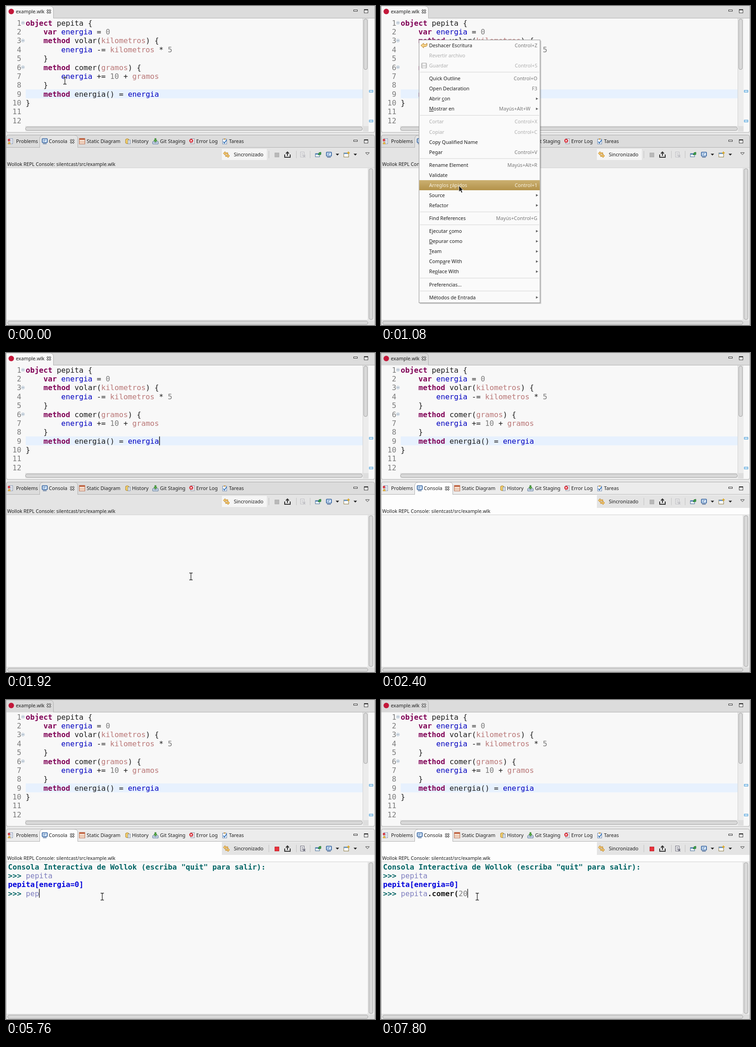
An HTML page for the animation above (8 s loop, 805 by 696 pixels).

```html
<!DOCTYPE html>
<html lang="es">
<head>
<meta charset="utf-8">
<title>Consola interactiva</title>
<style>
html, body { margin: 0; width: 100%; height: 100%; overflow: hidden; background: #e9e9e9; }
svg { display: block; width: 805px; height: 696px; }
text { font: 10.7px 'Noto Sans', sans-serif; fill: #1c1c1c; white-space: pre; }
.mono { font: 16.1px 'DejaVu Sans Mono', monospace; fill: #1c1c1c; }
.kw { font-weight: bold; fill: #7f0055; }
.field { fill: #0000c0; }
.param { fill: #b97777; }
.num, .line { fill: #7b7b7b; }
.prompt { font-weight: bold; fill: #006464; }
.result { font-weight: bold; fill: #0000dc; }
.typed { fill: #7d7dbe; }
.call { font-weight: bold; fill: #1c1c1c; }
.thumb { fill: #d9d9d9; stroke: #a3a3a3; }
.edge { fill: none; stroke: #ababab; }
.sep { stroke: #d4d4d4; }
.mn { text-decoration: underline; }
.key { fill: #777; text-anchor: end; }
.off text { fill: #aeaeae; }
.hover { fill: none; }
.on .hover { fill: url(#gold); }
.on text { fill: #faf4e4; }
.on .arrow { fill: #eadfc0; }
.arrow { fill: #666; }
</style>
</head>
<body>
<svg id="stage" viewBox="0 0 805 696"></svg>
<script>
const CHAR = 9.692, LINE = 19.36;
const EDITOR = { x: 43, y: 27.2 }, CONSOLE = { x: 4.5, y: 354 };

const rect = (x, y, w, h, fill, more = '') =>
  `<rect x="${x}" y="${y}" width="${w}" height="${h}" fill="${fill}" ${more}/>`;
const path = (d, fill = 'none', stroke = 'none', width = 1) =>
  `<path d="${d}" fill="${fill}" stroke="${stroke}" stroke-width="${width}"/>`;
const label = (x, y, s, cls = '') => `<text x="${x}" y="${y}" class="${cls}">${s}</text>`;
const group = (id, body, more = '') => `<g id="${id}" ${more}>${body}</g>`;
const at = (x, y, body) => `<g transform="translate(${x} ${y})">${body}</g>`;
const span = (cls, s) => `<tspan class="${cls}">${s}</tspan>`;
const thumb = (x, y, w, h) => `<rect x="${x}" y="${y}" width="${w}" height="${h}" rx="3.5" class="thumb"/>`;
const baseline = (area, row) => area.y + 15.5 + row * LINE;

/* Icons, centred on the origin */
const cross = path('M-3.8 -3.8L3.8 3.8M3.8 -3.8L-3.8 3.8', 'none', '#333', 3.7) +
  path('M-3.5 -3.5L3.5 3.5M3.5 -3.5L-3.5 3.5', 'none', '#f8f8f8', 1.6);
const sheet = stroke => rect(-4.5, -5.5, 8, 11, '#fbfbfb', `stroke="${stroke}"`) +
  path('M-2.5 -2.5h4M-2.5 0h4M-2.5 2.5h4', 'none', stroke);
const logo = '<circle r="6" fill="#c3183a"/>';
const monitor = rect(-5.5, -5.5, 11, 8.5, '#dcebfa', 'rx="1" stroke="#2f5f9e" stroke-width="1.6"') +
  path('M-3 -2.5h5M-3 0h3', 'none', '#2f5f9e') + path('M-4 5.5h8', 'none', '#55729a', 1.6);
const failure = '<circle cx="-1" cy="-1" r="4.2" fill="#d9303a"/>' +
  path('M-2.7 -2.7l3.4 3.4M.7 -2.7l-3.4 3.4', 'none', '#fff', 1.2);
const problems = at(1, 0, sheet('#7f93b5')) + rect(-6, -5, 5, 5, '#d8404a', 'rx="1"') +
  path('M-6 6l3 -5l3 5z', '#f0bd3e', '#b58620', .7);
const table = rect(-6, -6, 12, 12, '#fff7ee', 'stroke="#b45a36"') +
  rect(-6, -6, 12, 3, '#bd5a36') + path('M-6 0h12M-6 3h12', 'none', '#c87b50');
const history = path('M-5 -4q3.5 -3 7 0v8q-3.5 3 -7 0z', '#f3cf6b', '#a77c21') +
  rect(0, -2.5, 5, 8, '#fdfdfd', 'stroke="#71849f"') + path('M1.5 0h2M1.5 2.5h2', 'none', '#71849f');
const staging = path('M-6 1v5h12v-5h-3l-1 2h-4l-1 -2z', '#d9e3ee', '#4a6a94') +
  path('M-1.5 -6h3v4h2.5l-4 4l-4 -4h2.5z', '#56a847', '#2e7a2a', .8);
const errors = at(1.5, 0, sheet('#8a8a9c')) + at(-1, 0, failure);
const tasks = rect(-4.5, -4.5, 9, 10.5, '#f6f8fc', 'stroke="#6d88b1"') +
  rect(-2, -6, 4, 2.5, '#c79a4e') + path('M-3 1l2.5 3l5 -7', 'none', '#2e6fb5', 1.7);
const sync = path('M-7 -2.5l4 -4v2.5h6v3h-6v2.5z', '#f2c56b', '#b67a18', .8) +
  path('M7 3l-4 -4v2.5h-5v3h5v2.5z', '#f2c56b', '#b67a18', .8);
const share = path('M-6 0v6h12v-6M0 3v-8M-3.3 -2L0 -5.6L3.3 -2', 'none', '#333', 2);
const pin = rect(-6, -2, 9, 7, '#fff', 'stroke="#39648f"') + rect(-6, -2, 9, 2.2, '#4c7fb5') +
  path('M0 1l2 -5l4 -1v5z', '#3ea24b', '#24752f');
const newConsole = rect(-6, -3.5, 10.5, 9, '#fff', 'stroke="#8c7b43"') +
  rect(-6, -3.5, 10.5, 2.5, '#6b9bd2') + path('M4 -6.5v6M1 -3.5h6', 'none', '#d9a520', 1.8);
const caretDown = path('M-3.8 -2h7.6l-3.8 4z', '#222');
const clear = sheet('#667') + path('M1 1l5 5M6 1l-5 5', 'none', '#667', 1.5);
const undo = path('M-7 0l6 -5v3h4q3 0 3 -3q2 7 -3 7.5h-4v3z', '#f7d58c', '#b9832c');
const disk = rect(-5.5, -5.5, 11, 11, '#d6d6d6', 'rx="1" stroke="#a5a5a5"') +
  rect(-3, -5, 6, 4, '#f5f5f5') + rect(-3, 1.5, 6, 4, '#efefef');

/* Editor */
const source = `object pepita {
    var energia = 0
    method volar(kilometros) {
        energia -= kilometros * 5
    }
    method comer(gramos) {
        energia += 10 + gramos
    }
    method energia() = energia
}

`.split('\n');
const rules = { kw: /^(object|var|method)$/, field: /^energia$/, param: /^(kilometros|gramos)$/, num: /^\d+$/ };
const highlight = s => s.replace(/energia\(\)|\w+/g, word => {
  const rule = Object.keys(rules).find(name => rules[name].test(word));
  return rule ? span(rule, word) : word;
});
const code = source.map((s, i) => {
  const y = baseline(EDITOR, i);
  const fold = [0, 2, 5].includes(i)
    ? at(37, y - 6, '<circle r="3.2" fill="#eef3f8" stroke="#a9b9ca" stroke-width=".9"/>' + path('M-2 0h4', 'none', '#6d8196')) : '';
  return `<text x="33.5" y="${y}" text-anchor="end" class="mono line">${i + 1}</text>` + fold +
    label(EDITOR.x, y, highlight(s), 'mono');
}).join('');

const windowButtons = y => rect(758.5, y + 1.5, 8, 3, '#fff', 'stroke="#333"') +
  rect(781.5, y + .5, 8, 7.5, '#fff', 'stroke="#333"') + rect(781, y, 9, 2.4, '#333');
const marker = y => rect(792.5, y - 2, 8, 4, '#d3eafa', 'stroke="#4298d3"');

const editor =
  rect(0, 0, 805, 276, '#dcdcdc') +
  rect(1, 26, 803, 249, '#f8f8f8') +
  path('M104 26.5H805', 'none', '#b2b2b2') +
  '<path id="editorTab" d="M0 27V0H96q7.5 1 7.5 8V27" stroke="#b2b2b2"/>' +
  at(11.5, 12, logo) + label(21.5, 16, 'example.wlk') + at(93.5, 12, cross) + windowButtons(7) +
  rect(43, EDITOR.y + 8 * LINE, 736, LINE, '#e7f1fe') +
  code +
  rect(779, 27, 12, 235, '#ececec') + path('M778.5 27V262', 'none', '#d2d2d2') +
  rect(42, 262, 737, 12, '#ededed') + rect(779, 262, 12, 12, '#dedede') +
  path('M42 262.5H779', 'none', '#d6d6d6') +
  thumb(780.5, 28.5, 8, 110) + thumb(42.5, 264, 735, 7.5) + marker(186) + marker(251) +
  `<rect id="editorCaret" x="334.2" y="${EDITOR.y + 8 * LINE}" width="1.4" height="${LINE}"/>` +
  '<path class="edge" d="M.5 0V271q0 5 5 5H799.5q5 0 5 -5V0"/>';

/* Lower panel */
const tabs = [
  [10, problems, 22, 'Problems'], [84.5, monitor, 93.5, 'Consola'], [166, table, 176, 'Static Diagram'],
  [266, history, 275, 'History'], [326, staging, 336, 'Git Staging'], [406, errors, 415, 'Error Log'],
  [477, tasks, 486.5, 'Tareas']
].map(([x, icon, tx, s]) => at(x, 295, icon) + label(tx, 299.3, s)).join('');

const panel =
  rect(0, 276.5, 805, 4.5, '#e9e9e9') +
  '<path id="tabBar" d="M.5 696V287q0 -5.5 5 -5.5H799.5q5 0 5 5.5V696" stroke="#ababab"/>' +
  '<rect id="strip" x="1" y="308.5" width="803" height="44.5"/>' +
  path('M1 308.5H804', 'none', '#b2b2b2') +
  '<path id="consoleTab" d="M73.5 309V289q1 -7 8 -7H149q7.5 0 7.5 7V309" stroke="#b2b2b2"/>' +
  tabs + at(144.5, 295.3, cross) + windowButtons(291) +
  rect(471, 310, 333, 28, '#e4e4e4') +
  rect(471, 312, 98, 24, '#f5f5f5', 'id="syncButton"') +
  at(481, 324, sync) + label(497, 327.8, 'Sincronizado') +
  path('M573.5 316v16M633.5 316v16M663.5 316v16', 'none', '#c2c2c2') +
  '<rect id="stop" x="586.5" y="320.5" width="9" height="9"/>' + at(614, 324, share) +
  group('clear', at(647, 324, clear)) + at(681, 324, pin) + at(704.5, 324.5, monitor) +
  at(723, 324.3, caretDown) + at(743, 324, newConsole) + at(762, 324.3, caretDown) +
  path('M784.5 320h8l-4 4.5z', '#fff', '#333') +
  '<text x="2.5" y="348.7" style="font-size:10.43px">Wollok REPL Console: silentcast/src/example.wlk</text>' +
  rect(1, 353, 803, 343, '#f8f8f8') + path('M1 353H804', 'none', '#cfcfcf') +
  rect(790, 354, 14, 332, '#ebebeb') + rect(1, 685, 789, 11, '#ebebeb') + rect(790, 686, 14, 10, '#dedede') +
  path('M790 354V685.5H1', 'none', '#d2d2d2') +
  thumb(792, 355, 8.5, 329) + thumb(3.5, 687.5, 786, 7.5) +
  group('output', '') + `<rect id="caret" width="1.2" height="${LINE}"/>`;

/* Menus: "_" marks the mnemonic, "-" a separator, "!" disabled, ">" a submenu */
const menuItems = `Deshacer Escritura|Control+Z
!Revertir archivo
!Guardar|Control+S
-
Quick Outline|Control+O
Open Declaration|F3
Abrir _con>
_Mostrar en>|Mayús+Alt+W
-
!Cortar|Control+X
!Copiar|Control+C
Copy Qualified Name
Pegar|Control+V
-
Rename Element|Mayús+Alt+R
Validate
Arreglos _rápidos|Control+1
Source>
Refactor>
-
Find References|Mayús+Control+G
-
Ejecutar _como>
_Depurar como>
_Team>
Comp_are With>
Re_place With>
-
Preferencias...
-
Métodos de Entrada>`.split('\n');

function buildMenu(items, x, y, w, h) {
  let cy = y + 12;
  const rows = items.map(item => {
    if (item === '-') {
      cy += 6.1;
      return `<path class="sep" d="M${x + 2} ${cy - 14}H${x + w - 2}"/>`;
    }
    const [raw, key] = item.split('|');
    const text = raw.replace(/[!>]/g, '').replace(/_(.)/, span('mn', '$1'));
    const sub = raw.endsWith('>');
    const row = `<g class="row ${raw[0] === '!' ? 'off' : ''}">` +
      `<rect class="hover" x="${x + .5}" y="${cy - 11}" width="${w - 1}" height="22"/>` +
      label(x + 22, cy + 3.9, text) +
      (key ? label(x + w - (sub ? 21 : 6), cy + 3.9, key, 'key') : '') +
      (sub ? `<path class="arrow" d="M${x + w - 9} ${cy - 2.7}l5 2.7l-5 2.7z"/>` : '') + '</g>';
    cy += 22.05;
    return row;
  }).join('');
  return rect(x + 1.5, y + 1.5, w + 1, h + 1, '#000', 'opacity=".18" rx="1"') +
    rect(x, y, w, h, '#fafafa', 'stroke="#8f8f8f"') + rows;
}
const menu = buildMenu(menuItems, 83, 74, 264, 573.5) + at(94, 86, undo) + at(94, 130, disk);
const submenu = buildMenu(['1 Launch with Repl|Mayús+Alt+X R', '-', 'Configuraciones de Ejecución...'],
  345.5, 479.5, 277, 51.5) + at(356, 491, logo);

const beam = 'M-3.5 -7.5h2.5l1 1l1 -1h2.5M-3.5 7.5h2.5l1 -1l1 1h2.5M0 -6.5v13';
document.getElementById('stage').innerHTML =
  `<defs><linearGradient id="gold" x2="0" y2="1"><stop stop-color="#cbb071"/><stop offset="1" stop-color="#b3924a"/></linearGradient></defs>` +
  editor + panel + group('menu', menu) + group('submenu', submenu) +
  group('beam', path(beam, 'none', '#fff', 2.6) + path(beam, 'none', '#222', 1.3)) +
  group('pointer', path('M0 0V13.5L3.2 10.7L5.4 15.7L7.8 14.6L5.6 9.8H9.6Z', '#111', '#fff', .9));

/* Timelines: [start, value], each value holds until the next start */
const mouse = [
  [0, ['beam', 128.5, 163]], [120, ['beam', 96, 95]], [240, ['beam', 83, 75]],
  [480, ['pointer', 82.5, 75]], [960, ['pointer', 120, 184]], [1080, ['pointer', 170, 392]],
  [1200, ['pointer', 215, 597]], [1320, ['pointer', 265, 538]], [1440, ['pointer', 325, 494]],
  [1560, ['pointer', 363.5, 486]], [1680, ['pointer', 385, 490]], [1800, ['beam', 403.5, 487.5]],
  [2040, ['beam', 330, 456]], [2160, ['beam', 255, 436]], [2280, ['beam', 210, 429]],
  [2400, ['none', 0, 0]], [3000, ['beam', 210, 429]]
];
const menuLook = [[0, [0, 1]], [480, [.6, .985]], [600, [.96, .9975]], [720, [1, 1]], [1800, [0, 1]]];
const hovered = [[0, -1], [960, 4], [1080, 13], [1200, -1], [1320, 19], [1440, 17], [1800, -1]];
const firstInput = [[0, 0], [3600, 1], [3720, 2], [3840, 3], [3960, 4], [4080, 5], [4200, 6]];
const secondInput = [
  [0, 0], [5400, 1], [5520, 2], [5760, 3], [6000, 4], [6120, 5], [6240, 6], [6360, 7],
  [6480, 8], [6600, 10], [6720, 12], [6960, 13], [7680, 14], [7800, 15]
];
const caretOn = [[0, 0], [2640, 1], [3240, 0], [3600, 1], [4920, 0], [5400, 1], [7560, 0], [7680, 1]];
const editorCaretOn = [[0, 0], [120, 1], [2400, 0]];

const pick = (track, t) => track.reduce((value, [start, next]) => t >= start ? next : value, track[0][1]);
const el = id => document.getElementById(id);
const show = (id, visible) => el(id).style.display = visible ? '' : 'none';
const fill = (id, color) => el(id).setAttribute('fill', color);
const rows = [...document.querySelectorAll('#menu .row')];
const launchRow = document.querySelector('#submenu .row');

const typed = (s, n) => span('prompt', '&gt;&gt;&gt; ') + span('typed', s.slice(0, Math.min(n, 6))) +
  span('call', s.slice(6, Math.min(n, 13))) + span('num', s.slice(13, n));

function drawConsole(t) {
  const first = pick(firstInput, t), second = pick(secondInput, t), answered = t >= 4320;
  const lines = t < 2640 ? [] : [
    span('prompt', 'Consola Interactiva de Wollok (escriba "quit" para salir):'), typed('pepita', first)
  ];
  if (answered) lines.push(span('result', 'pepita[energia=0]'), typed('pepita.comer(20', second));
  const html = lines.map((s, i) => label(CONSOLE.x, baseline(CONSOLE, i), s, 'mono')).join('');
  if (drawConsole.last !== html) el('output').innerHTML = drawConsole.last = html;
  show('caret', pick(caretOn, t));
  el('caret').setAttribute('x', CONSOLE.x + (4 + (answered ? second : first)) * CHAR - .2);
  el('caret').setAttribute('y', CONSOLE.y + (answered ? 3 : 1) * LINE);
}

function draw(t) {
  const [kind, x, y] = pick(mouse, t);
  for (const id of ['beam', 'pointer']) {
    show(id, id === kind);
    el(id).setAttribute('transform', `translate(${x} ${y})`);
  }

  const [opacity, scale] = pick(menuLook, t);
  show('menu', opacity);
  el('menu').setAttribute('opacity', opacity);
  el('menu').setAttribute('transform', `translate(83 74) scale(${scale}) translate(-83 -74)`);
  const active = pick(hovered, t);
  rows.forEach((row, i) => row.classList.toggle('on', i === active));
  show('submenu', t >= 1560 && t < 1800);
  launchRow.classList.toggle('on', t >= 1680);

  const focused = t >= 2400, running = t >= 2640;
  fill('editorTab', focused ? '#dadada' : '#f8f8f8');
  fill('tabBar', focused ? '#ececec' : '#dcdcdc');
  fill('consoleTab', focused ? '#fdfdfd' : '#e4e4e4');
  fill('strip', focused ? '#fdfdfd' : '#e4e4e4');
  show('syncButton', !focused);
  show('editorCaret', pick(editorCaretOn, t));
  fill('stop', running ? '#e8323c' : '#b9b9b9');
  el('stop').setAttribute('stroke', running ? '#c2202a' : '#adadad');
  el('clear').setAttribute('opacity', running ? 1 : .3);
  drawConsole(t);
}

const begin = performance.now();
function tick() {
  draw((performance.now() - begin) % 8000);
  requestAnimationFrame(tick);
}
tick();
</script>
</body>
</html>
```
